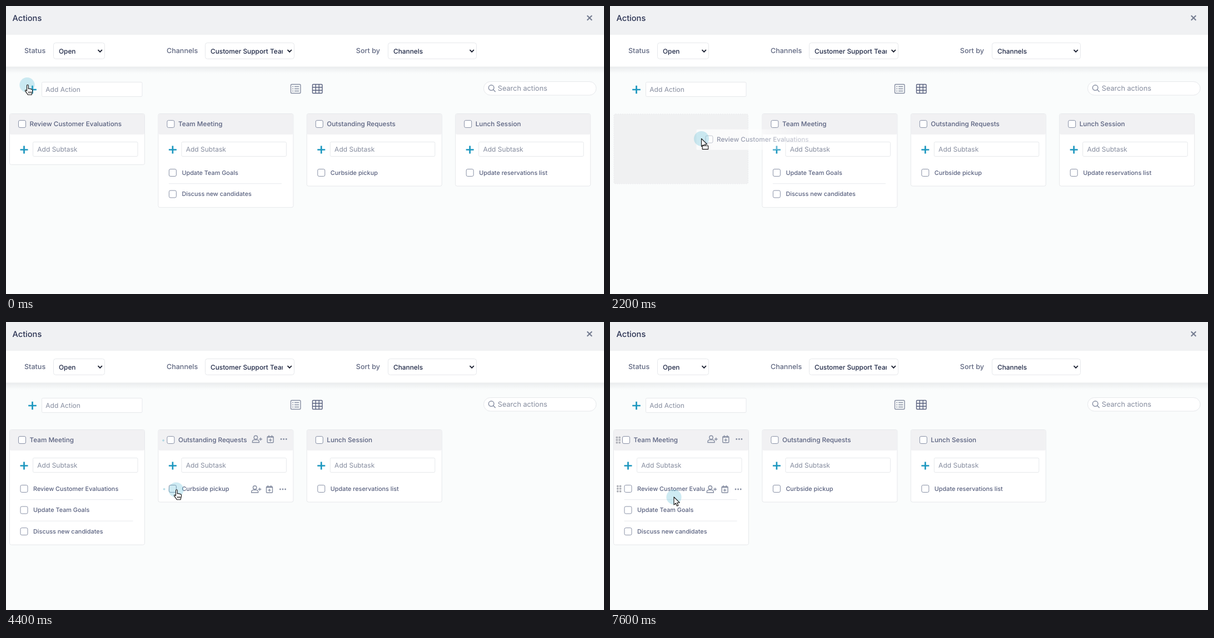
An HTML page that plays this animation: 1076 by 520 pixels, repeating every 7.8 s.

```html
<!DOCTYPE html>
<html lang="en">
<head>
<meta charset="utf-8">
<title>Actions board</title>
<style>
  html, body { margin: 0; width: 100%; height: 100%; overflow: hidden; background: #fafcfc; }
  svg { display: block; width: 100vw; height: 100vh; }
  text { font: 500 11.72px Inter, sans-serif; fill: #59617f; white-space: pre; text-rendering: geometricPrecision; }
  .title { font-size: 14.6px; fill: #2a3252; }
  .label { font-size: 12.55px; fill: #5f6780; }
  .value { font-size: 11.85px; fill: #1f2846; }
  .hint { font-size: 12px; font-weight: 400; fill: #858c9e; }
  .search { font-size: 12.7px; }
  .item { font-size: 10.85px; }
  .box { fill: #fff; stroke: #e6e8eb; }
  .check { fill: #fff; stroke: #8991a6; }
  .line { fill: none; stroke: #e8eaed; }
  .plus { fill: none; stroke: #1c97bf; stroke-width: 2.7; }
  .icon { fill: none; stroke: #858da1; stroke-width: 1.4; }
  .solid { fill: #858da1; }
  .slot { fill: #f0f1f2; stroke: #e9eaed; stroke-dasharray: 2 2; }
  .pointer { fill: #fff; stroke: #111; stroke-width: 1.1; stroke-linejoin: round; }
</style>
</head>
<body>
<svg id="stage" viewBox="0 0 1076 520"></svg>
<script>
const LOOP = 7800, STEP = 200, COLUMN = 267.4, ROW = 38.6;

const text = (x, y, s, cls = '') => `<text x="${x}" y="${y}" class="${cls}">${s}</text>`;
const rect = (x, y, w, h, cls, rx = 0, more = '') =>
  `<rect x="${x}" y="${y}" width="${w}" height="${h}" rx="${rx}" class="${cls}" ${more}/>`;
const path = (d, cls, more = '') => `<path d="${d}" class="${cls}" ${more}/>`;
const group = (id, body) => `<g id="${id}">${body}</g>`;
const check = (x, y) => rect(x - 6.5, y - 6.5, 13, 13, 'check', 2.5);
const plus = (x, y, r = 7) => path(`M${x - r} ${y}h${2 * r}M${x} ${y - r}v${2 * r}`, 'plus');

function select(x, w, value, clip = '') {
  return rect(x, 66.5, w, 29, 'box', 4)
    + `<g ${clip}>${text(x + 9.5, 85.5, value, 'value')}</g>`
    + path(`M${x + w - 12} 79.2l3.7 3.7 3.7-3.7`, '', 'fill="none" stroke="#1d2233" stroke-width="1.9"');
}

// Cards are drawn in the first column; gap opens a drop slot above the items.
function card(id, title, items, gap = 0) {
  const height = 92 + items.length * ROW + gap;
  let body = rect(6.5, 194.5, 243, height, 'box', 3)
    + rect(7, 195, 242, 37, '', 2.5, 'fill="#f1f1f3"')
    + check(29, 213) + text(42.5, 217.4, title)
    + plus(32.5, 259.5) + rect(48.5, 245.5, 188.5, 26, 'box', 2)
    + text(56.3, 262.7, 'Add Subtask', 'hint');
  if (gap) body += rect(18.5, 281.5, 219, gap - 5, 'slot', 3);
  items.forEach((name, i) => {
    const y = 301 + i * ROW + gap;
    if (i) body += path(`M25.5 ${y - 18.9}H228.5`, 'line');
    body += check(32.5, y) + text(49, y + 3.6, name, 'item');
  });
  return group(id, body);
}

function tools(x, y) {
  let dots = '';
  for (let i = -1; i < 2; i++) dots += `<circle cx="${x + 48.3 + i * 4.6}" cy="${y}" r="1.4" class="solid"/>`;
  return `<circle cx="${x - 2}" cy="${y - 3}" r="3.2" class="icon"/>`
    + path(`M${x - 8} ${y + 6}v-1.2q0-3.4 3.4-3.4h5.2q3.4 0 3.4 3.4v1.2zM${x + 4} ${y}h5.6M${x + 6.8} ${y - 2.8}v5.6`, 'icon')
    + rect(x + 18.8, y - 4.8, 11, 11, 'icon', 1.2)
    + path(`M${x + 19} ${y - 3.4}h10.6M${x + 21.6} ${y - 7}v3M${x + 27} ${y - 7}v3M${x + 21.6} ${y + 1.6}h5.4M${x + 24.3} ${y - 1.1}v5.4`, 'icon')
    + dots;
}

function grip(x, y) {
  let dots = '';
  for (let i = 0; i < 6; i++)
    dots += rect(x + (i % 2 ? 0.7 : -4.1), y - 6.3 + (i >> 1) * 4.6, 3.5, 3.5, '', 1, 'fill="#b1b3ba"');
  return `<g class="grip">${dots}</g>
    <circle class="spark" cx="${x + 1}" cy="${y + 0.8}" r="1.2" fill="#fff" stroke="#79bfd3" stroke-width=".9"/>`;
}

const hover = (id, x, y, gripX, gripY, back) => group(id,
  rect(x - 12, y - 13, 68, 26, '', 0, `fill="${back}"`) + tools(x, y) + grip(gripX, gripY));

const fade = (id, color, from, to, x1, x2) =>
  `<linearGradient id="${id}" gradientUnits="userSpaceOnUse" x1="${x1}" x2="${x2}" y1="0" y2="0">
    <stop stop-color="${color}" stop-opacity="${from}"/>
    <stop offset="1" stop-color="${color}" stop-opacity="${to}"/></linearGradient>`;

const listIcon = rect(512.5, 141.5, 17.5, 16, 'icon', 1.5)
  + [145.5, 149.5, 153.5].map(y => path(`M515.2 ${y}h2M519 ${y}h8.3`, 'icon')).join('');
const gridIcon = rect(551.5, 141.5, 17.5, 16, 'icon', 1.2, 'style="stroke:#59617f"')
  + path('M551.5 146.8h17.5M551.5 152.2h17.5M557.3 141.5v16M563.2 141.5v16', 'icon', 'style="stroke:#59617f"');

document.getElementById('stage').innerHTML = `<defs>
    ${fade('veil', '#fff', 0.7, 0, 100, 192)}
    ${fade('ink', '#59617f', 0.68, 0.28, 60, 212)}
    <linearGradient id="shade" x2="0" y2="1"><stop stop-color="#e9ebed"/><stop offset="1" stop-color="#fafcfc"/></linearGradient>
    <clipPath id="crop"><rect x="360" y="67" width="138" height="28"/></clipPath>
  </defs>`
  + rect(0, 0, 1076, 520, '', 0, 'fill="#fafcfc"')
  + rect(0, 109, 1076, 13, '', 0, 'fill="url(#shade)"')
  + rect(0, 52, 1076, 57.5, '', 0, 'fill="#fff"')
  + rect(0, 0, 1076, 52, '', 0, 'fill="#f0f1f3"')
  + text(11.5, 27, 'Actions', 'title')
  + path('M1045.7 17.2l8.6 8.6m0-8.6l-8.6 8.6', '', 'stroke="#747c90" stroke-width="2.1"')
  + text(33, 84.6, 'Status', 'label') + select(85.5, 92, 'Open')
  + text(289, 84.6, 'Channels', 'label') + select(358.5, 160, 'Customer Support Team', 'clip-path="url(#crop)"')
  + text(629.8, 84.6, 'Sort by', 'label') + select(687.5, 159, 'Channels')
  + plus(47.5, 151, 7.3) + rect(64.5, 137.5, 180.5, 26, 'box', 2) + text(71.3, 154.5, 'Add Action', 'hint')
  + listIcon + gridIcon
  + rect(859.5, 136.5, 202.5, 24.5, 'box', 12.2)
  + '<circle cx="873.2" cy="147.6" r="4.8" class="icon"/>' + path('M876.7 151.1l4 4', 'icon')
  + text(884.8, 153.2, 'Search actions', 'hint search')
  + group('hole', rect(7, 195, 241.5, 126, 'slot', 3))
  + card('review', 'Review Customer Evaluations', [])
  + card('team', 'Team Meeting', ['Update Team Goals', 'Discuss new candidates'])
  + card('teamOpen', 'Team Meeting', ['Update Team Goals', 'Discuss new candidates'], 48)
  + card('teamFull', 'Team Meeting', ['Review Customer Evaluations', 'Update Team Goals', 'Discuss new candidates'])
  + card('requests', 'Outstanding Requests', ['Curbside pickup'])
  + card('lunch', 'Lunch Session', ['Update reservations list'])
  + hover('headTools', 184, 211.5, 14.7, 213, '#f1f1f3')
  + hover('rowTools', 182.3, 302, 16.2, 301, '#fff')
  + group('ghost', rect(6, 195, 186, 37, '', 2, 'fill="url(#veil)"')
    + `<g opacity=".5">${check(29, 213)}</g>`
    + '<text x="42.5" y="217.4" style="fill:url(#ink)">Review Customer Evaluations</text>')
  + '<circle id="press" cx="15" cy="216" fill="#f58a96"/>'
  + group('mouse', '<circle id="halo" r="13.6" fill="#4fb6d3"/>'
    + group('arrow', path('M0 0V14.2L3.3 11.2 5.5 16.3 7.9 15.3 5.7 10.2H10.2Z', 'pointer'))
    + group('carry', rect(1.7, 12.8, 10.5, 6.3, 'pointer'))
    + group('hand', path('M-.5 1.2c0-1.9 2.8-1.9 2.8 0V7.2c.3-1 2.5-1 2.7.3c.5-.8 2.3-.7 2.5.6c.7-.6 2-.2 2 1.2V12.5c0 1.8-1.3 2.6-1.3 5.2H1.2c-.3-1.7-4-5-4.6-7.2c-.3-1.3 1.2-1.7 2-.8l.9 1.2ZM2.8 12v3M5 12v3M7.2 12v3', 'pointer')));

// Rows of time, x, y.
const mousePath = [
  [0, 38, 142.5], [200, 28, 155], [400, 18, 169], [600, 14, 185], [800, 13.5, 201], [1200, 15, 215.5],
  [1400, 15, 215.5], [1600, 22, 215.5], [1800, 41, 217], [2000, 95, 228], [2400, 234, 251], [2600, 270, 257],
  [2800, 284.5, 259], [3000, 291, 275], [3400, 306, 303], [5200, 306, 303], [5400, 297, 306],
  [5800, 238, 322.5], [6000, 175, 328], [6200, 130, 323], [6400, 116.5, 315],
  [7000, 116.5, 315], [7200, 115.8, 315.7], [7400, 115.8, 315.7], [7600, 115, 316]
];
const liftPath = [[1600, 16, 211], [1800, 16, 211], [2800, 13.5, 213]];

function along(points, t) {
  let i = points.findIndex(p => p[0] >= t);
  if (i < 0) i = points.length - 1;
  const b = points[i], a = points[Math.max(i - 1, 0)];
  const k = b[0] > a[0] ? Math.min((t - a[0]) / (b[0] - a[0]), 1) : 1;
  return [1, 2].map(n => a[n] + (b[n] - a[n]) * k);
}

const el = id => document.getElementById(id);
const show = (node, on) => { node.style.display = on ? '' : 'none'; };
const move = (id, x, y) => el(id).setAttribute('transform', `translate(${x} ${y})`);

function setHover(id, on, column, row, sparkling) {
  show(el(id), on);
  if (!on) return;
  move(id, column * COLUMN, row * ROW);
  show(el(id).querySelector('.spark'), sparkling);
  show(el(id).querySelector('.grip'), !sparkling);
}

function draw(time) {
  const t = Math.floor(time / STEP) * STEP;
  const between = (a, b) => t >= a && t < b;
  const dropped = t >= 4400, dragging = between(1600, 4400), open = between(3200, 4400);

  show(el('review'), t < 1600);
  show(el('hole'), dragging);
  show(el('team'), t < 3200);
  show(el('teamOpen'), open);
  show(el('teamFull'), dropped);
  move('team', COLUMN, 0);
  move('teamOpen', COLUMN, 0);
  move('requests', (dropped ? 1 : 2) * COLUMN, 0);
  move('lunch', (dropped ? 2 : 3) * COLUMN, 0);

  const onRequests = between(4400, 5600), onTeam = t >= 6000;
  const sparkling = t === 800 || t === 4400 || t === 6000;
  setHover('headTools', between(800, 1600) || onRequests || onTeam, onRequests ? 1 : 0, 0, sparkling);
  setHover('rowTools', onRequests || onTeam, onRequests ? 1 : 0, between(6000, 6400) ? 1 : 0, sparkling);

  const [x, y] = along(mousePath, t), [liftX, liftY] = along(liftPath, t);
  move('mouse', x, y);
  move('ghost', x - liftX, y - liftY);
  show(el('ghost'), dragging);
  show(el('carry'), dragging);
  const pointing = t === 0 || between(4400, 5400);
  show(el('hand'), pointing);
  show(el('arrow'), !pointing);
  el('halo').setAttribute('opacity', between(1400, 2000) ? 0.38 : 0.28);

  const fading = (t - 1400) / 400;
  show(el('press'), between(1400, 2000));
  el('press').setAttribute('r', 14 + 4 * fading);
  el('press').setAttribute('opacity', 0.4 - 0.36 * fading);
}

function tick() {
  draw(performance.now() % LOOP);
  requestAnimationFrame(tick);
}
tick();
</script>
</body>
</html>
```
